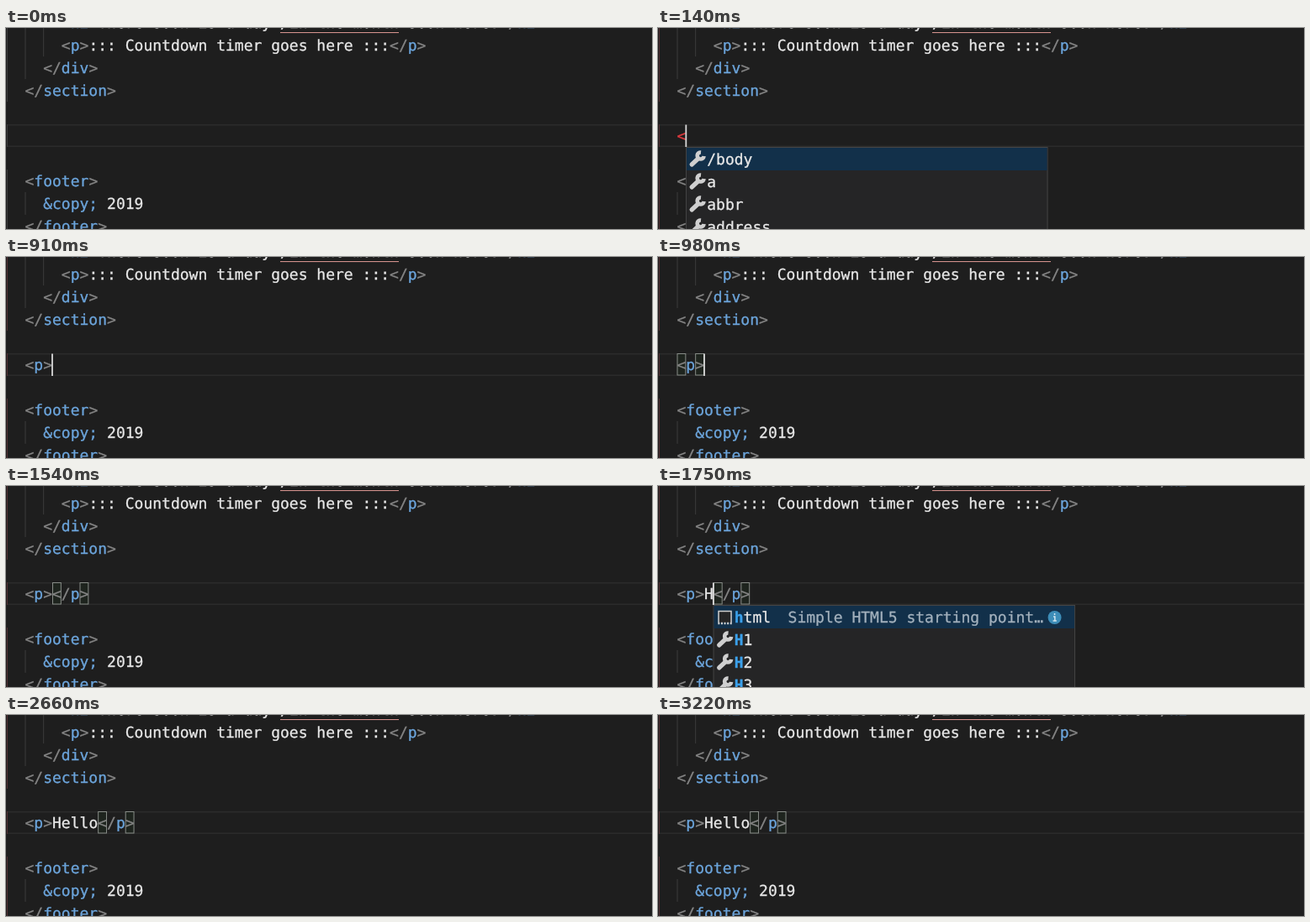
Write an HTML page that moves like this. It is 768x240 px and loops after 3290 ms.

```html
<!DOCTYPE html>
<html lang="en">
<head>
<meta charset="utf-8">
<title>Typing a paragraph</title>
<style>
html, body { margin: 0; width: 100%; height: 100%; overflow: hidden; background: #1e1e1e; }
svg { display: block; }
text { font: 18px "DejaVu Sans Mono", monospace; white-space: pre; text-rendering: geometricPrecision; stroke-width: .3px; }
</style>
</head>
<body>
<svg id="stage" width="768" height="240" viewBox="0 0 768 240"></svg>
<script>
const LOOP = 3290, CHAR = 10.836, LEFT = 22.5, ROW = 27;
const GRAY = '#858585', BLUE = '#6ca5dc', WHITE = '#e8e8e8', RED = '#e03a3e', MATCH = '#3ba0ea';
const stage = document.getElementById('stage');

// Suggestion lists: items, length of the highlighted match, info icon, snippet first
const lists = {
  all: { items: ['/body', 'a', 'abbr', 'address'], match: 0 },
  p: { items: ['p', 'param', 'picture', 'pre'], match: 1, info: true },
  h: { items: ['html', 'H1', 'H2', 'H3'], match: 1, info: true, snippet: 'Simple HTML5 starting point…' },
  he: { items: ['head', 'header'], match: 2, info: true }
};

// Each step: start time, text before the cursor, text after it, and what else shows
const steps = [
  { at: 0, typed: '', off: true },
  { at: 140, typed: '<', list: 'all', bad: true },
  { at: 420, typed: '<p', list: 'p' },
  { at: 560, typed: '<p', list: 'p', footerBad: true },
  { at: 910, typed: '<p>' },
  { at: 980, typed: '<p>', boxes: [0, 2] },
  { at: 1050, typed: '<p>', rest: '</p>' },
  { at: 1540, typed: '<p>', rest: '</p>', off: true },
  { at: 1750, typed: '<p>H', rest: '</p>', list: 'h' },
  { at: 1820, typed: '<p>He', rest: '</p>', list: 'he' },
  { at: 1960, typed: '<p>Hel', rest: '</p>' },
  { at: 2100, typed: '<p>Hell', rest: '</p>' },
  { at: 2240, typed: '<p>Hello', rest: '</p>' },
  { at: 2660, typed: '<p>Hello', rest: '</p>', off: true }
];

const colX = col => LEFT + col * CHAR;
const esc = s => s.replace(/&/g, '&amp;').replace(/</g, '&lt;');
const ink = color => `fill="${color}" stroke="${color}"`;
const rect = (x, y, w, h, fill, more = '') =>
  `<rect x="${x}" y="${y}" width="${w}" height="${h}" fill="${fill}" ${more}/>`;
const text = (x, y, body, color = WHITE) => `<text x="${x}" y="${y}" ${ink(color)}>${body}</text>`;
const span = (color, s, more = '') => `<tspan ${ink(color)} ${more}>${esc(s)}</tspan>`;

function code(col, row, source, bad) {
  const tokens = source.match(/<\/?|>|&\w+;|\w+|[^\w<>&]+/g) || [];
  const body = tokens.map((token, i) => {
    const isTag = i && tokens[i - 1][0] === '<';
    const color = bad ? RED : /^[<>]/.test(token) ? GRAY : isTag || token[0] === '&' ? BLUE : WHITE;
    return span(color, token);
  });
  return text(colX(col), row * ROW + .4, body.join(''));
}

function guides(tint) {
  const bar = (x, y, h, fill = '#3c3c3c') => rect(x, y, 1, h, fill);
  return bar(1, 0, 88, tint) + bar(1, 115, 27, tint) + bar(1, 169, 71, tint) +
    bar(colX(0), 0, 61) + bar(colX(2), 0, 34) + bar(colX(0), 196, 27);
}

const wrench = y => `<g transform="translate(-.4 ${y + .5})" fill="none" stroke="#cfcfcf">
  <path d="M7.5 20.5L15 13.5" stroke-width="5.2" stroke-linecap="round"/>
  <path d="M18.4 6A4 4 0 1 0 22 10.5" stroke-width="4.6"/></g>`;

const snippetIcon = `<path d="M6.5 21V7.5H21.5V21" fill="#252526" stroke="#d0d0d0" stroke-width="1.5"/>
  <path d="M5.8 22H22.5" stroke="#d0d0d0" stroke-width="2.4" stroke-dasharray="2 1.6"/>`;

const infoIcon = `<circle cx="406" cy="15" r="8" fill="#3d8db8"/>
  <path d="M406 10V12M404.5 14H406.3V19M404 19H408.3" fill="none" stroke="#d4e6f0" stroke-width="1.5"/>`;

function popup(col, { items, match, info, snippet }) {
  const rows = items.map((item, i) => {
    const name = span(MATCH, item.slice(0, match), 'font-weight="bold"') + esc(item.slice(match));
    return (snippet && !i ? snippetIcon : wrench(i * ROW)) + text(25.2, 21 + i * ROW, name);
  });
  const height = items.length * ROW + 2;
  return `<g transform="translate(${colX(col) - .3} 142)">` +
    rect(.5, .5, 429.5, height, '#252526', 'stroke="#454545"') +
    rect(1, 1, 428.5, ROW, '#12304a') + rows.join('') +
    (snippet ? text(89, 21, snippet, '#a3b1bd') : '') + (info ? infoIcon : '') + '</g>';
}

const bracketBox = col =>
  rect(colX(col) + .5, 115.5, CHAR - 1, 25.5, '#1e241e', 'stroke="#888d88"');

function draw({ typed, rest = '', list, bad, footerBad, off, boxes }) {
  const cursor = typed.length;
  const marked = boxes || (rest ? [cursor, cursor + 3] : []);
  stage.innerHTML =
    rect(0, 0, 768, 240, '#1e1e1e') +
    rect(2, 115, 766, 1.5, '#2b2b2b') + rect(2, 140.5, 766, 1.5, '#2b2b2b') +
    guides(typed ? '#533033' : '#3c3c3c') +
    code(4, 0, '<h2>There soon is a day /in the month soon here.</h2>') +
    rect(326, 5, 141, 1, '#d8948f') +
    code(4, 1, '<p>::: Countdown timer goes here :::</p>') +
    code(2, 2, '</div>') +
    code(0, 3, '</section>') +
    marked.map(bracketBox).join('') +
    code(0, 5, typed + rest, bad) +
    code(0, 7, '<footer>', footerBad) +
    code(2, 8, '&copy; 2019') +
    code(0, 9, '</footer>') +
    (list ? popup(cursor, lists[list]) : '') +
    (off ? '' : rect(colX(cursor) - .9, 115.5, 1.8, 26.5, '#d8d8d8'));
}

let shown;
function tick() {
  const time = performance.now() % LOOP;
  const step = steps.filter(s => s.at <= time).pop();
  if (step !== shown) draw(shown = step);
  requestAnimationFrame(tick);
}
tick();
</script>
</body>
</html>
```
